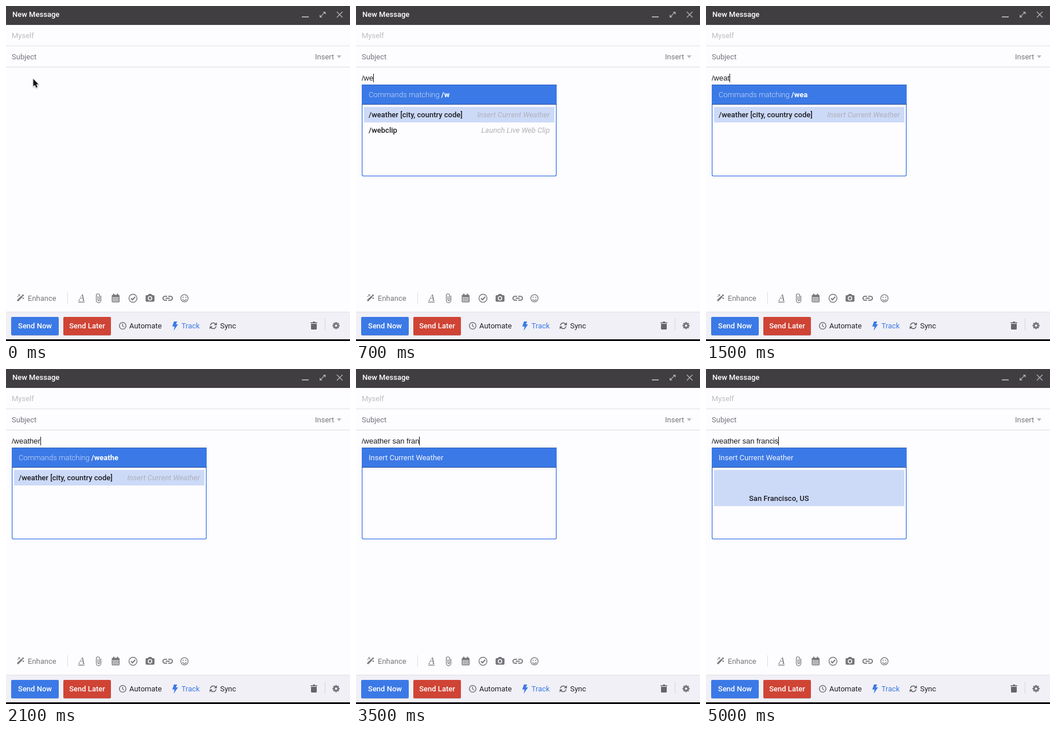
An HTML page with a canvas for the animation above (5.1 s loop, 600 by 584 pixels).

```html
<!DOCTYPE html>
<html lang="en">
<head>
<meta charset="utf-8">
<title>New Message</title>
<style>
html, body { margin: 0; width: 100%; height: 100%; overflow: hidden; background: #fdfcfe; }
canvas { display: block; width: 600px; height: 584px; }
</style>
</head>
<body>
<canvas id="stage"></canvas>
<script>
const W = 600, H = 584, LOOP = 5100;
const BLUE = '#3b79e6', RED = '#cf4435', PAPER = '#fdfcfe', GREY = '#75757a';
const canvas = document.getElementById('stage');
const ctx = canvas.getContext('2d');
const dpr = window.devicePixelRatio || 1;
canvas.width = W * dpr;
canvas.height = H * dpr;

// Typed text and the moment each character lands.
const TYPED = '/weather san francis';
const KEYS = [400, 600, 700, 1200, 1500, 1700, 1900, 2100, 2400, 2700,
  2900, 3000, 3100, 3200, 3300, 3400, 3500, 3800, 4100, 4400];
const LAG = 100, ARGS_AT = 2500, RESULT_AT = 4700;

const COMMANDS = [
  ['/availability', 'Launch Share Availability'],
  ['/badge', 'Launch Social Badges'],
  ['/button', 'Launch Call to Action'],
  ['/cal', 'Launch Share Availability'],
  ['/cal [time]', 'Insert Availability'],
  ['/weather [city, country code]', 'Insert Current Weather'],
  ['/webclip', 'Launch Live Web Clip']
];

const roboto = style => `${style} 13px Roboto, sans-serif`;

function text(str, x, y, color, style = '400', align = 'left') {
  ctx.font = roboto(style);
  ctx.fillStyle = color;
  ctx.textAlign = align;
  ctx.fillText(str, x, y);
  return ctx.measureText(str).width;
}

function rect(x, y, w, h, color) {
  ctx.fillStyle = color;
  ctx.fillRect(x, y, w, h);
}

function box(x, y, w, h, r, color) {
  ctx.beginPath();
  ctx.roundRect(x, y, w, h, r);
  ctx.fillStyle = color;
  ctx.fill();
}

function stroke(d, color = GREY, width = 1.4) {
  ctx.strokeStyle = color;
  ctx.lineWidth = width;
  ctx.stroke(new Path2D(d));
}

function fill(d, color = GREY) {
  ctx.fillStyle = color;
  ctx.fill(new Path2D(d));
}

function arc(x, y, r, color = GREY, width = 1.4, from = 0, to = Math.PI * 2) {
  ctx.beginPath();
  ctx.arc(x, y, r, from, to);
  ctx.strokeStyle = color;
  ctx.lineWidth = width;
  ctx.stroke();
}

function dot(x, y, r, color = GREY) {
  ctx.beginPath();
  ctx.arc(x, y, r, 0, Math.PI * 2);
  ctx.fillStyle = color;
  ctx.fill();
}

function drawHead() {
  const c = '#aaa9ad';
  rect(0, 0, W, 33, '#403e41');
  text('New Message', 11, 19, '#fff', '500');
  rect(516, 18, 12, 2, c);
  stroke('M549 18L556 11', c, 1.2);
  fill('M552.5 10H557.5V15ZM547 15V20H552Z', c);
  stroke('M577 10L587 20M587 10L577 20', c, 1.5);
  text('Myself', 10, 56, '#bdbcc1');
  rect(0, 69, W, 1, '#e0dfe3');
  text('Subject', 10, 93, '#77767f');
  text('Insert', 539, 93, '#77767f');
  fill('M577 86H585L581 91Z', '#b9b8bd');
  rect(0, 106, W, 1, '#dcdbe0');
}

function drawTools() {
  // wand
  stroke('M20 514L28 506', GREY, 3);
  stroke('M28.5 505.5L30.5 503.5', GREY, 2.6);
  stroke('M23 502V506M21 504H25M30 508V511M28.5 509.5H31.5M19.5 506.5H21.5', GREY, 1);
  text('Enhance', 38, 514, '#77767c');
  rect(107, 499, 1, 20, '#dddce1');
  // text style
  ctx.font = 'italic 17px "Liberation Serif", serif';
  ctx.fillStyle = GREY;
  ctx.textAlign = 'center';
  ctx.fillText('A', 132, 514);
  rect(126, 515.5, 11, 1.3, GREY);
  // paperclip
  stroke('M165.5 505V513.3A4 4 0 0 1 157.5 513.3V504.6A2.8 2.8 0 0 1 163.2 504.6V512.4A1.4 1.4 0 0 1 160.4 512.4V506', GREY, 1.2);
  // calendar
  box(184.5, 503.5, 13.5, 13, 1.5, GREY);
  rect(187, 501.5, 2, 3, GREY);
  rect(193.5, 501.5, 2, 3, GREY);
  for (let i = 0; i < 12; i++) rect(186 + i % 4 * 2.8, 507.5 + Math.floor(i / 4) * 2.8, 1.9, 1.9, PAPER);
  // check
  arc(221.5, 509.5, 7);
  stroke('M218 509.5L220.7 512.2L225.3 507', GREY, 1.9);
  // camera
  box(243.5, 504, 15.5, 11.5, 2, GREY);
  fill('M247.5 504.5L249 502H253.5L255 504.5Z');
  arc(251.2, 509.6, 3.1, PAPER, 1.5);
  // link
  stroke('M281 506.2H277A3.3 3.3 0 0 0 277 512.8H281M283 506.2H287A3.3 3.3 0 0 1 287 512.8H283M278.5 509.5H285.5', GREY, 1.8);
  // smiley
  arc(311.2, 509.5, 6.4, GREY, 1.3);
  dot(308.9, 507.8, 1);
  dot(313.5, 507.8, 1);
  arc(311.2, 509.8, 3.5, GREY, 1.2, 0.3, Math.PI - 0.3);
}

function drawButton(label, x, color) {
  box(x, 543, 83, 32, 2, '#c9c8d2');
  box(x, 542, 83, 32, 2, color);
  text(label, x + 41.5, 562, '#fff', '500', 'center');
}

function drawGear(x, y) {
  ctx.save();
  ctx.translate(x, y);
  for (let i = 0; i < 8; i++) {
    rect(-1.4, -6.2, 2.8, 3, GREY);
    ctx.rotate(Math.PI / 4);
  }
  arc(0, 0, 3.4, GREY, 2.8);
  ctx.restore();
}

function drawFoot() {
  rect(0, 533, W, 48, '#f1f0f6');
  rect(0, 533, W, 1, '#e1e0e5');
  rect(0, 581, W, 3, '#09090c');
  drawButton('Send Now', 9, BLUE);
  drawButton('Send Later', 100, RED);
  arc(203.5, 557.5, 5.8, '#626166', 1.3);
  stroke('M203.3 554V558L206 559.6', '#626166', 1.2);
  text('Automate', 215, 562, '#222126');
  fill('M293 550H298.5L296.3 555H300L292.5 566L294 558.8H290Z', BLUE);
  text('Track', 306, 562, BLUE);
  arc(361.5, 557.5, 5, '#626166', 1.6, Math.PI + 0.15, Math.PI * 2 - 0.65);
  arc(361.5, 557.5, 5, '#626166', 1.6, 0.15, Math.PI - 0.65);
  fill('M367.8 551.5V556.5H362.8ZM355.2 563.5V558.5H360.2Z', '#626166');
  text('Sync', 373.5, 562, '#222126');
  fill('M531 551.5H535L536 550H538.5L539.5 551.5H543V553H531ZM532 554H542V562.5Q542 564 540.5 564H533.5Q532 564 532 562.5Z', '#66656a');
  rect(556, 545, 1, 21, '#d8d7dd');
  drawGear(575.7, 557.2);
}

function drawPointer() {
  const d = 'M47.5 127V140L50.4 137.4L52.5 142.2L54.8 141.2L52.8 136.5H56.7Z';
  ctx.save();
  ctx.shadowColor = 'rgba(0,0,0,.35)';
  ctx.shadowBlur = 2 * dpr;
  ctx.shadowOffsetY = dpr;
  stroke(d, '#fff', 1.6);
  ctx.restore();
  fill(d, '#111');
}

function drawRow([name, hint], y) {
  text(name, 22, y, '#1d1c21', '500');
  text(hint, 338, y, '#b0b0b8', 'italic 400', 'right');
}

function drawPopup(query, t) {
  box(10, 137, 340, 160, 3, BLUE);
  box(11.3, 138, 337.4, 157.7, 2, PAPER);
  box(10, 137, 340, 35, [3, 3, 0, 0], BLUE);
  rect(10, 137, 340, 1, '#2d62bd');
  rect(10, 171, 340, 1, '#29509c');

  if (t >= ARGS_AT) {
    text('Insert Current Weather', 22, 159, '#f2f5fd');
    if (t >= RESULT_AT) {
      rect(14, 176, 332, 63, '#ccdaf8');
      text('San Francisco, US', 75, 230, '#1d1c21', '500');
    }
    return;
  }

  const w = text('Commands matching ', 22, 159, '#cfdcf7', '300');
  text(query, 22 + w, 159, '#fff', '700');
  rect(14, 176, 332, 27, '#ccdaf8');
  ctx.save();
  ctx.beginPath();
  ctx.rect(11, 172, 338, 124);
  ctx.clip();
  COMMANDS.filter(([name]) => name.startsWith(query))
    .slice(0, 5)
    .forEach((cmd, i) => drawRow(cmd, 194 + i * 27));
  ctx.restore();
}

const typedAt = t => TYPED.slice(0, KEYS.filter(k => k <= t).length);

function drawBody(t) {
  const typed = typedAt(t);
  if (!typed) return drawPointer();
  ctx.font = '13px "Liberation Sans", Arial, sans-serif';
  ctx.textAlign = 'left';
  ctx.fillStyle = '#1c1b20';
  ctx.fillText(typed, 10, 130);
  rect(Math.round(10 + ctx.measureText(typed).width), 118, 1, 15, '#111');
  const query = typedAt(t - LAG).trim();
  if (query) drawPopup(query, t);
}

function draw(now) {
  // Steps fall on a tenth of a second.
  const t = Math.floor((now - start) % LOOP / 100) * 100;
  ctx.setTransform(dpr, 0, 0, dpr, 0, 0);
  rect(0, 0, W, H, PAPER);
  drawHead();
  drawBody(t);
  drawTools();
  drawFoot();
  requestAnimationFrame(draw);
}

const start = 0;
requestAnimationFrame(draw);
</script>
</body>
</html>
```
